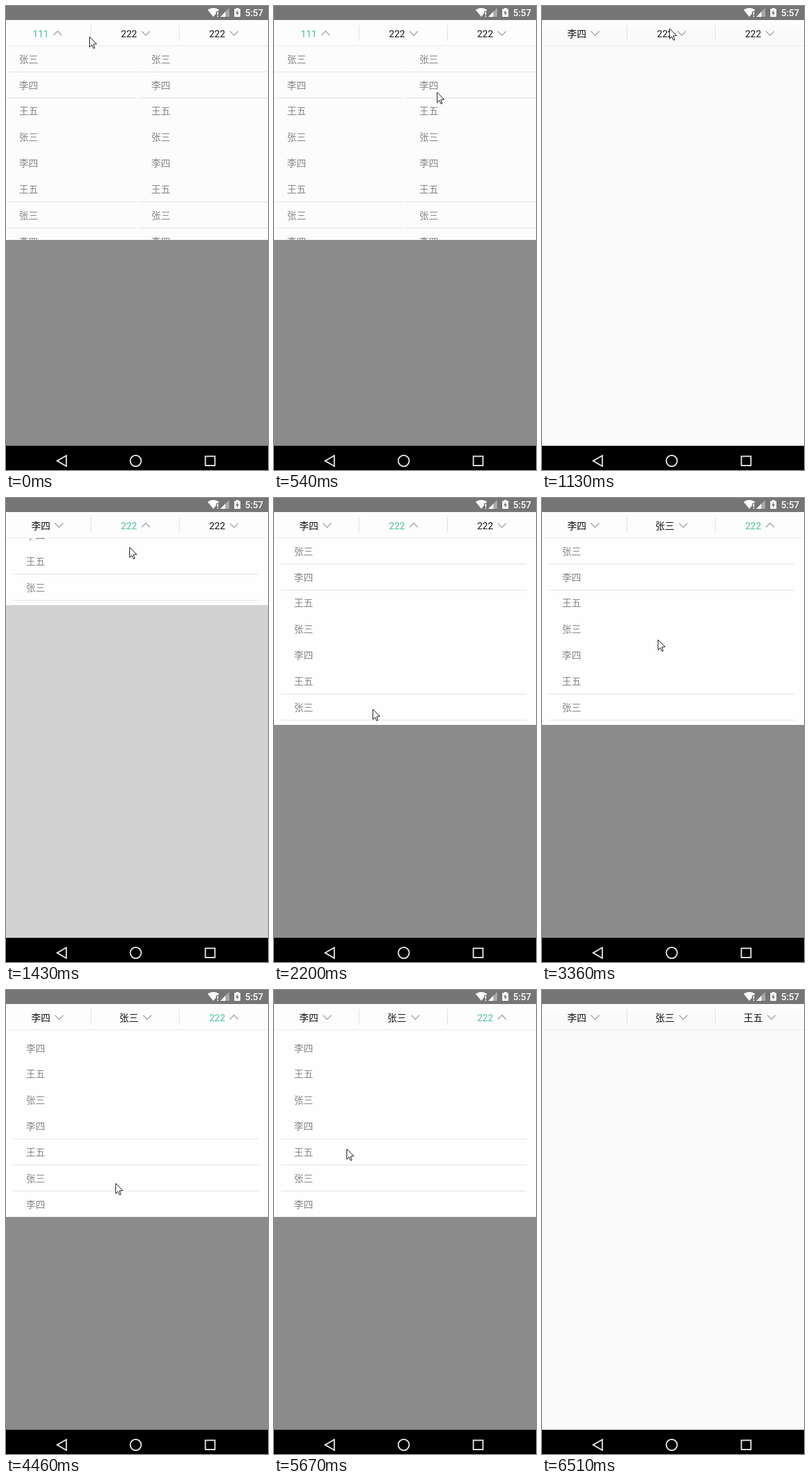
These frames come from a looping animation (412 px wide and 728 px high, 7.23 s). An HTML page with a canvas:

```html
<!DOCTYPE html>
<html lang="zh-CN">
<head>
<meta charset="utf-8">
<title>Drop-down menu</title>
<style>
  html, body { margin: 0; width: 100%; height: 100%; overflow: hidden; background: #000; }
  canvas { display: block; }
</style>
</head>
<body>
<canvas id="stage" width="412" height="728"></canvas>
<script>
const ctx = document.getElementById('stage').getContext('2d');
const LOOP = 7230, REFRESH = 135, SLIDE = 250, ROW = 245 / 6;
const TOP = 63, BOTTOM = 690, BAR = '#757575';
const SCROLL_AT = 3780, SCROLL_BY = 33;
const FONT = 'Roboto, "Noto Sans CJK SC", "Noto Sans CJK", sans-serif';
const NAMES = ['张三', '李四', '王五'];

// Bursts of pointer movement; the screen is refreshed only during these
const MOVES = [
  { from: 150, to: 540, x: 256, y: 135 },
  { from: 820, to: 1130, x: 200, y: 35 },
  { from: 1430, to: 2200, x: 155, y: 331 },
  { from: 2640, to: 2640, x: 235, y: 158 },
  { from: 2790, to: 3070, x: 335, y: 42 },
  { from: 3220, to: 3360, x: 182, y: 222 },
  { from: 3640, to: 3920, x: 194, y: 328 },
  { from: 4320, to: 5280, x: 106, y: 228 },
  { from: 5420, to: 5670, x: 114, y: 249 },
  { from: 5820, to: 6380, x: 368, y: 569 },
  { from: 6510, to: 6510, x: -20, y: -20 }
];

const MENUS = [
  { before: '111', after: '李四', opens: -SLIDE, closes: 700, split: true },
  { before: '222', after: '张三', opens: 1340, closes: 2390 },
  { before: '222', after: '王五', opens: 3000, closes: 5740 }
];

const clamp = v => Math.min(1, Math.max(0, v));
const openness = (menu, t) =>
  clamp((t - menu.opens) / SLIDE) * (1 - clamp((t - menu.closes) / SLIDE));

// Time of the latest refresh and where the pointer stood then
function screenAt(time) {
  let state = { t: 0, x: 131, y: 48 };
  for (const { from, to, x, y } of MOVES) {
    if (time < from) break;
    const last = Math.round((to - from) / REFRESH);
    const step = last ? Math.min(last, Math.floor((time - from) / (to - from) * last)) : 0;
    const k = (step + 1) / (last + 1);
    state = {
      t: last ? from + (to - from) * step / last : from,
      x: Math.round(state.x + (x - state.x) * k),
      y: Math.round(state.y + (y - state.y) * k)
    };
  }
  return state;
}

function rect(x, y, w, h, color) {
  ctx.fillStyle = color;
  ctx.fillRect(x, y, w, h);
}

function text(str, x, y, color, size = 15, weight = 400) {
  ctx.font = `${weight} ${size}px ${FONT}`;
  ctx.fillStyle = color;
  ctx.fillText(str, x, y);
}

function shape(points, { fill, stroke, width = 1, open }) {
  ctx.beginPath();
  points.forEach(([x, y]) => ctx.lineTo(x, y));
  if (!open) ctx.closePath();
  if (fill) { ctx.fillStyle = fill; ctx.fill(); }
  if (stroke) { ctx.strokeStyle = stroke; ctx.lineWidth = width; ctx.stroke(); }
}

function drawStatusBar() {
  rect(0, 0, 412, 22, BAR);
  // Wi-Fi fan with exclamation mark
  ctx.beginPath();
  ctx.moveTo(326, 17);
  ctx.lineTo(317, 6);
  ctx.quadraticCurveTo(326, 0, 335, 6);
  ctx.fillStyle = '#fff';
  ctx.fill();
  rect(330.5, 8, 5, 10, BAR);
  rect(332, 9, 1.7, 5, '#fff');
  rect(332, 15.3, 1.7, 1.7, '#fff');
  // Signal strength
  shape([[337, 17], [351, 3], [351, 17]], { fill: '#a9a9a9' });
  shape([[337, 17], [345, 9], [345, 17]], { fill: '#fff' });
  // Charging battery
  rect(359, 4.5, 9.5, 12.5, '#fff');
  rect(362, 3, 3.5, 2, '#fff');
  shape([[364.5, 6], [361, 11.5], [363.3, 11.5], [363, 15.5], [366.5, 10], [364.2, 10]], { fill: BAR });
  text('5:57', 376, 16, '#fff', 14.4, 500);
}

function drawNavBar() {
  rect(0, BOTTOM, 412, 38, '#000');
  shape([[80.5, 713.7], [94.8, 705.5], [94.8, 722]], { stroke: '#e6e6e6', width: 2 });
  ctx.beginPath();
  ctx.arc(204, 713.6, 8.6, 0, 2 * Math.PI);
  ctx.stroke();
  ctx.strokeRect(313.5, 706.5, 15, 14.5);
}

function drawTab(menu, index, t) {
  const active = t >= menu.opens && t < menu.closes;
  const chosen = t >= menu.closes;
  const label = chosen ? menu.after : menu.before;
  const width = chosen ? 30 : 25.3;
  const left = 54.65 + 138.7 * index - width / 2;
  const arrow = left + width + 7.3;
  const [edge, tip] = active ? [46, 39.5] : [39.5, 46];
  text(label, left, 48.5, active ? '#48bf9f' : '#111');
  shape([[arrow, edge], [arrow + 6.5, tip], [arrow + 13, edge]], { stroke: '#aaa', width: 1.6, open: true });
  if (index) rect(Math.floor(138.5 * index - 5), 30, 1, 25, '#e0e0e0');
}

function drawHeader(t, isOpen) {
  rect(0, 22, 412, 41, '#fdfdfd');
  if (!isOpen) rect(0, 36, 412, 27, '#fafafa');
  rect(0, 62, 412, 1, '#e8e8e8');
  MENUS.forEach((menu, index) => drawTab(menu, index, t));
}

function drawColumn(left, right, scroll) {
  for (let row = 0; row < 8; row++) {
    const y = Math.floor(89.2 + row * ROW) - scroll;
    const ruled = scroll ? row > 3 : row % 5 < 2;
    text(NAMES[row % 3], left + 20.5, y, '#868686');
    if (ruled) rect(left, y + 14, right - left, 1, '#e2e2e2');
  }
}

function drawPanel(menu, shown, scroll) {
  const height = menu.split ? 304 : 293;
  ctx.save();
  ctx.beginPath();
  ctx.rect(0, TOP, 412, BOTTOM - TOP);
  ctx.clip();
  rect(0, TOP, 412, BOTTOM - TOP, `rgba(0,0,0,${0.447 * shown})`);
  ctx.translate(0, Math.round((shown - 1) * height));
  ctx.beginPath();
  ctx.rect(0, TOP, 412, height);
  ctx.clip();
  rect(0, TOP, 412, height, menu.split ? '#fcfcfc' : '#fefefe');
  if (menu.split) {
    drawColumn(0, 204, scroll);
    drawColumn(208, 412, scroll);
  } else {
    drawColumn(11, 397, scroll);
  }
  ctx.restore();
}

function drawPointer(x, y) {
  const arrow = [[0, 0], [0, 16], [3.5, 12.5], [6, 18], [8, 17.5], [6, 11.5], [11, 11]];
  shape(arrow.map(([dx, dy]) => [x + dx + 0.5, y + dy + 0.5]), { fill: '#fff', stroke: '#111' });
}

function draw(now) {
  const { t, x, y } = screenAt(now % LOOP);
  const current = MENUS.find(menu => openness(menu, t) > 0);
  rect(0, 22, 412, BOTTOM - 22, '#fafafa');
  if (current) drawPanel(current, openness(current, t), t >= SCROLL_AT ? SCROLL_BY : 0);
  drawHeader(t, Boolean(current));
  drawStatusBar();
  drawNavBar();
  drawPointer(x, y);
}

const start = performance.now();
function tick() {
  draw(performance.now() - start);
  requestAnimationFrame(tick);
}
tick();
</script>
</body>
</html>
```
